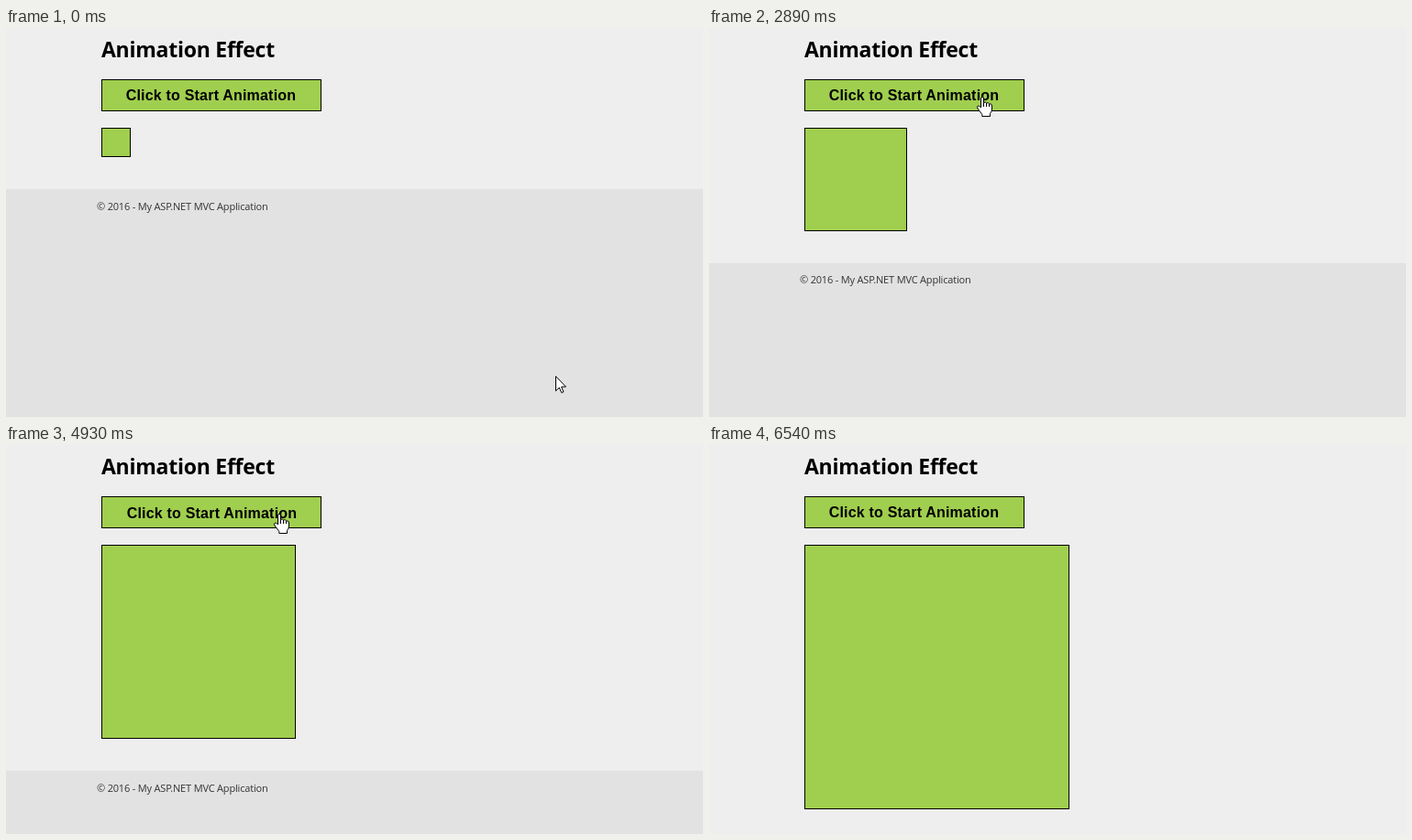
These frames come from a looping animation (760x425 px, 6610 ms). An HTML page:

```html
<!DOCTYPE html>
<html lang="en">
<head>
<meta charset="utf-8">
<title>Animation Effect</title>
<style>
html, body { margin: 0; width: 100%; height: 100%; overflow: hidden; background: #eee; }
svg { display: block; }
.ui { font-family: "Open Sans", "Noto Sans", sans-serif; }
.title { font-size: 23px; font-weight: 700; letter-spacing: -.25px; }
.label { font: 700 16px "Liberation Sans", Arial, sans-serif; letter-spacing: .2px; }
.note { font-size: 11px; letter-spacing: -.18px; fill: #333; }
.frame { fill: #a0ce4e; stroke: #000; }
.cursor path { fill: #fff; stroke: #000; stroke-linejoin: round; }
</style>
</head>
<body>
<svg width="760" height="425" viewBox="0 0 760 425">
  <rect width="760" height="425" fill="#eee"/>
  <rect id="footer" width="760" height="425" fill="#e2e2e2"/>
  <text id="note" class="ui note" x="99">© 2016 - My ASP.NET MVC Application</text>
  <text class="ui title" x="104" y="32">Animation Effect</text>
  <rect class="frame" x="104.5" y="56.5" width="239" height="34"/>
  <text id="label" class="label">Click to Start Animation</text>
  <rect id="box" class="frame" x="104.5" y="109.5"/>
  <g id="arrow" class="cursor">
    <path d="M.5 .5V16.5L4.3 12.9L6.8 18.5L9 17.5L6.6 12H11.5Z"/>
  </g>
  <g id="hand" class="cursor">
    <path d="M4.5 12V2Q4.5 .5 6 .5Q7.5 .5 7.5 2V6.5Q9.5 5.3 10.5 7Q12.3 6 13.5 7.8Q16.5 7.5 16.5 10V14Q16.5 16 14.5 18.5V21.5H5.8V19.5L1 13Q-.2 10.6 1.5 10Q2.8 9.8 4.5 12Z"/>
    <path d="M7.5 6.5V11M10.5 7V11M13.5 8V11"/>
  </g>
</svg>
<script>
const LOOP = 6610, GROW = 400, STEP = 20.025;
// Start of each queued growth step
const growths = [640, 1120, 1540, 1960, 2890, 3300, 3740, 4110, 4560, 4960, 5336, 5740, 6251];
// Press and release times of the slow first clicks
const clicks = [[550, 640], [850, 1080], [1300, 1490], [1720, 1960], [2240, 2890]];
// Steady clicking afterwards
const RAPID = { from: 2890, to: 5730, period: 355, release: .3 };

const el = id => document.getElementById(id);
const [footer, note, label, box, arrow, hand] =
  ["footer", "note", "label", "box", "arrow", "hand"].map(el);

const clamp = v => Math.min(1, Math.max(0, v));
const swing = p => .5 - Math.cos(Math.PI * clamp(p)) / 2;
const mix = (a, b, p) => a + (b - a) * p;
const set = (node, attrs) => {
  for (const name in attrs) node.setAttribute(name, attrs[name]);
};

function isPressed(t) {
  if (t < RAPID.from) return clicks.some(([down, up]) => t >= down && t < up);
  return t < RAPID.to && (t - RAPID.from) / RAPID.period % 1 > RAPID.release;
}

function pointer(t) {
  if (t < 5720) {
    const p = swing((t - 30) / 360);
    return [mix(599, 298, p), mix(380, 75, p)];
  }
  const p = swing((t - 5720) / 400);
  return [mix(298, 530, p), mix(75, 430, p)];
}

function draw(t) {
  const size = growths.reduce((sum, start) => sum + STEP * swing((t - start) / GROW), 32);
  const width = Math.round(size), bottom = Math.round(size + 109.45);
  set(box, { width: width - 1, height: bottom - 110 });
  set(footer, { y: bottom + 35 });
  set(note, { y: width + 167 });

  const shift = isPressed(t) ? 1 : 0;
  set(label, { x: 130.7 + shift, y: 79 + shift });

  const [x, y] = pointer(t).map(Math.round);
  const over = x < 344 && y >= 56 && y < 91;
  set(arrow, { transform: `translate(${x} ${y})`, visibility: over ? "hidden" : "visible" });
  set(hand, { transform: `translate(${x - 6} ${y})`, visibility: over ? "visible" : "hidden" });
}

const begin = performance.now();
function tick() {
  draw((performance.now() - begin) % LOOP);
  requestAnimationFrame(tick);
}
tick();
</script>
</body>
</html>
```
